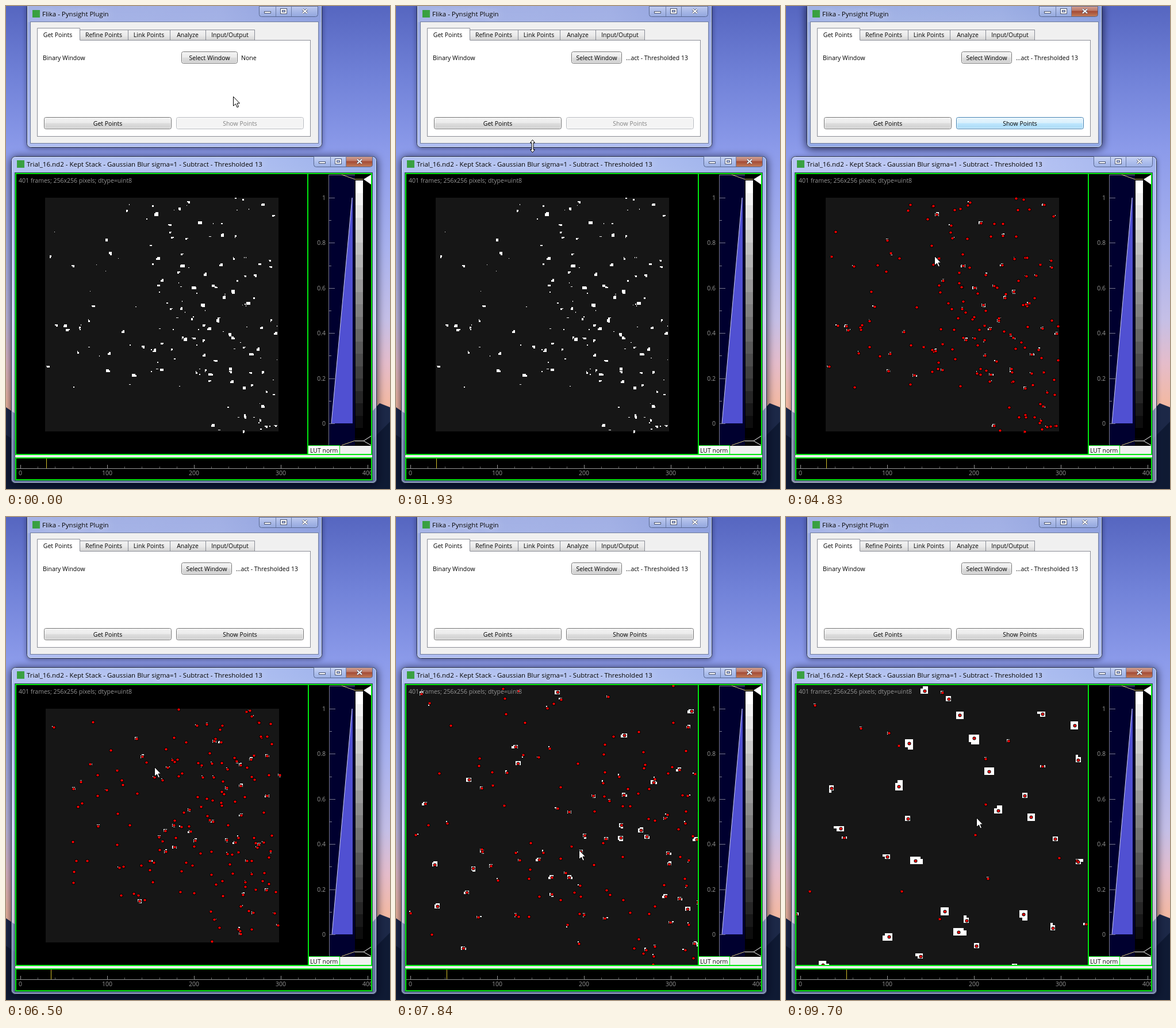
Animation, 668 px wide and 839 px high, one loop 9.73 s. Source, as an HTML page with a canvas:

```html
<!DOCTYPE html>
<html lang="en">
<head>
<meta charset="utf-8">
<title>Get Points</title>
<style>
html, body { margin: 0; width: 100%; height: 100%; overflow: hidden; background: #101830; }
canvas { display: block; }
</style>
</head>
<body>
<canvas id="stage" width="668" height="839"></canvas>
<script>
const ctx = document.getElementById('stage').getContext('2d');
const LOOP = 9730, W = 668, H = 839;
const SCALE = 406 / 256, LEFT = 69, TOP = 333, SIZE = 256;
const GREEN = '#00e810', GRAY = '#969696';
const UI = '10.5px "Open Sans", "Noto Sans", sans-serif';
const TITLE = '11.5px "Open Sans", "Noto Sans", sans-serif';

// What happens when, in ms
const PICK = 600, CHOSEN = 1360, GET = 2490, READY = 3060, SHOW = 4190, FOCUS = 5100;
const PLAY = 5800, ZOOM = 7840, RESUME = 8250;

// Pointer stops: time, x, y
const PATH = [
  [60, 395, 157], [420, 352, 92], [760, 352, 92], [1070, 359, 422], [1660, 359, 422],
  [1930, 237, 234], [2220, 215, 203], [3360, 215, 203], [3480, 322, 201], [3680, 372, 202],
  [4300, 372, 202], [4800, 258, 434], [7110, 258, 434], [7640, 318, 578], [RESUME, 318, 578],
  [8770, 331, 522]
];

const clamp = v => Math.max(0, Math.min(1, v));
const ramp = (t, a, b) => clamp((t - a) / (b - a));
const steps = (t, from, gap, max) => Math.max(0, Math.min(max, Math.floor((t - from) / gap + 1)));
const frameIndex = t => 30 + steps(t, PLAY, 167, 12) + steps(t, RESUME, 145, 11);

function random(seed) {
  let a = seed * 7919 + 17;
  return () => {
    a = (a + 0x6D2B79F5) | 0;
    let n = Math.imul(a ^ (a >>> 15), 1 | a);
    n = (n + Math.imul(n ^ (n >>> 7), 61 | n)) ^ n;
    return ((n ^ (n >>> 14)) >>> 0) / 4294967296;
  };
}

// Wheel zoom around one point of the picture
function view(t) {
  const step = steps(t, ZOOM, 52, 6);
  if (!step) return { s: SCALE, x: t < CHOSEN ? LEFT - 1 : LEFT, y: TOP };
  const s = 2.2 * 1.15 ** (step - 1);
  return { s, x: 318 - (318 - LEFT) / SCALE * s, y: 580 - (580 - TOP) / SCALE * s };
}

// Spots get denser to the right and thin out in the left corners
function makeSpots(index) {
  const rnd = random(index), list = [];
  while (list.length < 178) {
    const x = rnd(), y = rnd(), keep = rnd(), kind = rnd();
    const empty = x < 0.08 || (x < 0.35 && y < 0.17) || (x < 0.68 && y > 0.82);
    const density = empty ? 0.04 : 0.28 + 0.5 * x * x + 0.25 * x * y;
    if (keep > density) continue;
    const size = kind < 0.42 ? 1 : kind < 0.8 ? 2 : 3;
    list.push({
      x: Math.floor(x * SIZE), y: Math.floor(y * SIZE),
      w: size + (rnd() < 0.3 ? 1 : 0), h: size,
      bump: size > 1 ? Math.floor(rnd() * 5) : 4
    });
  }
  return list;
}
const cache = {};
const spotsAt = index => cache[index] || (cache[index] = makeSpots(index));

function rect(x, y, w, h, fill) {
  ctx.fillStyle = fill;
  ctx.fillRect(x, y, w, h);
}
function frame(x, y, w, h, color, width = 1) {
  ctx.strokeStyle = color;
  ctx.lineWidth = width;
  ctx.strokeRect(x + width / 2, y + width / 2, w - width, h - width);
}
function line(color, width, ...p) {
  ctx.strokeStyle = color;
  ctx.lineWidth = width;
  ctx.beginPath();
  for (let i = 0; i < p.length; i += 2) ctx.lineTo(p[i], p[i + 1]);
  ctx.stroke();
}
function poly(fill, ...p) {
  ctx.fillStyle = fill;
  ctx.beginPath();
  for (let i = 0; i < p.length; i += 2) ctx.lineTo(p[i], p[i + 1]);
  ctx.closePath();
  ctx.fill();
}
function disc(x, y, r, fill) {
  ctx.fillStyle = fill;
  ctx.beginPath();
  ctx.arc(x, y, r, 0, 7);
  ctx.fill();
}
function text(s, x, y, color = '#000', align = 'left', font = UI) {
  ctx.font = font;
  ctx.fillStyle = color;
  ctx.textAlign = align;
  ctx.fillText(s, x, y);
}
function blend(y0, y1, ...stops) {
  const g = ctx.createLinearGradient(0, y0, 0, y1);
  stops.forEach((c, i) => Array.isArray(c)
    ? g.addColorStop(c[0], c[1]) : g.addColorStop(i / (stops.length - 1), c));
  return g;
}
function rounded(x, y, w, h, r) {
  ctx.beginPath();
  ctx.roundRect(x, y, w, h, r);
}
function clipTo(x, y, w, h) {
  ctx.save();
  ctx.beginPath();
  ctx.rect(x, y, w, h);
  ctx.clip();
}

function drawDesktop() {
  rect(0, 0, W, H, blend(0, H, [0, '#5666c0'], [0.15, '#7182d8'], [0.3, '#8c9bea'],
    [0.5, '#a9b2ee'], [0.65, '#c5bfe6'], [0.74, '#e5bcca'], [0.82, '#f2b9a4'], [1, '#e6a080']));
  poly('#1c2847', 0, 697, 22, 712, 60, 740, 600, 745, 650, 690, W, 697, W, H, 0, H);
  poly('#0f1a33', 0, 745, 30, 765, 620, 770, W, 722, W, H, 0, H);
}

function drawWindow(x, y, w, h, titleY, title, active) {
  ctx.save();
  ctx.beginPath();
  ctx.rect(0, 0, W, H);
  ctx.roundRect(x, y, w, h, 7);
  ctx.clip('evenodd');
  ctx.shadowColor = active ? 'rgba(0,0,20,.8)' : 'rgba(0,0,20,.45)';
  ctx.shadowBlur = active ? 15 : 9;
  ctx.shadowOffsetY = 2;
  rounded(x, y, w, h, 7);
  ctx.fillStyle = '#000';
  ctx.fill();
  ctx.restore();

  rounded(x, y, w, h, 7);
  ctx.fillStyle = active
    ? blend(y, y + h, 'rgba(172,194,240,.65)', 'rgba(205,220,245,.65)', 'rgba(150,178,228,.6)')
    : blend(y, y + h, 'rgba(190,206,246,.6)', 'rgba(205,218,248,.55)');
  ctx.fill();
  ctx.save();
  ctx.clip();
  const shine = ctx.createLinearGradient(x, 0, x + w, 0);
  shine.addColorStop(0, 'rgba(255,255,255,.15)');
  shine.addColorStop(0.65, 'rgba(255,255,255,.12)');
  shine.addColorStop(1, 'rgba(90,120,200,.12)');
  rect(x, y, w, titleY - y + 15, shine);
  ctx.restore();
  rounded(x + 0.5, y + 0.5, w - 1, h - 1, 7);
  ctx.strokeStyle = '#28304c';
  ctx.lineWidth = 1;
  ctx.stroke();
  rounded(x + 1.5, y + 1.5, w - 3, h - 3, 6);
  ctx.strokeStyle = 'rgba(235,245,255,.65)';
  ctx.stroke();

  rect(x + 10, titleY - 6, 13, 13, '#38a040');
  ctx.save();
  ctx.shadowColor = 'rgba(255,255,255,.95)';
  ctx.shadowBlur = 11;
  text(title, x + 27, titleY + 4.5, '#000', 'left', TITLE);
  ctx.restore();
  drawControls(x + w - 110, titleY - 13, active);
}

function drawControls(x, y, active) {
  rounded(x + 0.5, y + 0.5, 102, 18, [0, 0, 4, 4]);
  ctx.fillStyle = blend(y, y + 18, 'rgba(225,233,252,.6)', 'rgba(150,172,222,.5)');
  ctx.fill();
  if (active) {
    rounded(x + 57, y, 46, 18, [0, 0, 4, 0]);
    ctx.fillStyle = blend(y, y + 18, [0, '#d0a398'], [0.45, '#bd7866'], [0.5, '#a34a35'], [1, '#c07a58']);
    ctx.fill();
  }
  rounded(x + 0.5, y + 0.5, 102, 18, [0, 0, 4, 4]);
  ctx.strokeStyle = '#56658f';
  ctx.lineWidth = 1;
  ctx.stroke();
  line('#6b7ba6', 1, x + 29.5, y, x + 29.5, y + 18);
  line('#6b7ba6', 1, x + 56.5, y, x + 56.5, y + 18);
  rect(x + 9, y + 9, 12, 4, '#4a5470');
  rect(x + 10, y + 10, 10, 2, '#fff');
  frame(x + 37, y + 4, 12, 10, '#4a5470');
  frame(x + 38, y + 5, 10, 8, '#fff', 2);
  frame(x + 40, y + 7, 6, 4, '#4a5470');
  for (const [color, width] of [['#4a4f66', 3.6], ['#fff', 1.9]]) {
    line(color, width, x + 76, y + 5.5, x + 84, y + 12.5);
    line(color, width, x + 84, y + 5.5, x + 76, y + 12.5);
  }
}

function drawButton(label, x, y, w, hover = 0, enabled = true) {
  const h = 21;
  rounded(x + 0.5, y + 0.5, w - 1, h - 1, 3);
  ctx.fillStyle = enabled
    ? blend(y, y + h, [0, '#f3f3f3'], [0.48, '#ebebeb'], [0.52, '#dddddd'], [1, '#cfcfcf']) : '#f4f4f4';
  ctx.fill();
  if (hover > 0) {
    ctx.globalAlpha = hover;
    ctx.fillStyle = blend(y, y + h, [0, '#eaf6fd'], [0.48, '#d9f0fc'], [0.52, '#bee6fd'], [1, '#a7d9f5']);
    ctx.fill();
    ctx.globalAlpha = 1;
  }
  ctx.strokeStyle = !enabled ? '#b5b8bd' : hover > 0.5 ? '#3c7fb1' : '#707070';
  ctx.lineWidth = 1;
  ctx.stroke();
  rounded(x + 1.5, y + 1.5, w - 3, h - 3, 2);
  ctx.strokeStyle = 'rgba(255,255,255,.75)';
  ctx.stroke();
  text(label, x + w / 2, y + 14.5, enabled ? '#000' : '#838383', 'center');
}

function drawPlugin(t, active) {
  drawWindow(36, -6, 514, 252, 13, 'Flika - Pynsight Plugin', active);
  rect(42, 27, 502, 212, '#6f7c9c');
  rect(43, 28, 500, 210, '#f0f0f0');
  rect(54, 59, 476, 168, '#fff');
  frame(54, 59, 476, 168, '#898c95');
  let tabX = 128;
  for (const [label, w] of [['Refine Points', 84], ['Link Points', 73], ['Analyze', 62], ['Input/Output', 85]]) {
    rect(tabX, 41, w + 1, 19, blend(41, 60, '#f2f2f2', '#ebebeb', '#d2d2d2'));
    frame(tabX, 41, w + 1, 19, '#898c95');
    text(label, tabX + w / 2, 54, '#000', 'center');
    tabX += w;
  }
  rect(54, 38, 75, 22, '#fff');
  line('#898c95', 1, 54.5, 60, 54.5, 38.5, 128.5, 38.5, 128.5, 59.5);
  text('Get Points', 90, 53.5, '#000', 'center');

  const chosen = t >= CHOSEN;
  text('Binary Window', 64, 94);
  const selectHover = ramp(t, 330, 480) * (1 - ramp(t, 780, 960));
  drawButton('Select Window', 305, 79, chosen ? 88 : 98, selectHover);
  text(chosen ? '...act - Thresholded 13' : 'None', chosen ? 400 : 409, 94);
  const getHover = ramp(t, 2060, 2220) * (1 - ramp(t, 3480, 3680));
  const showHover = ramp(t, 3500, 3680) * (1 - ramp(t, FOCUS, FOCUS + 300));
  drawButton('Get Points', 66, 193, 222, getHover);
  drawButton('Show Points', 296, 193, 222, showHover, t >= READY);
}

function drawSpots(t, index, width) {
  const v = view(t), spots = spotsAt(index);
  const sx = x => Math.round(v.x + x * v.s), sy = y => Math.round(v.y + y * v.s);
  const cells = (x, y, w, h, fill) => rect(sx(x), sy(y), sx(x + w) - sx(x), sy(y + h) - sy(y), fill);
  clipTo(18, 292, width, 486);
  cells(0, 0, SIZE, SIZE, '#161616');
  for (const { x, y, w, h, bump } of spots) {
    cells(x, y, w, h, '#fff');
    if (bump < 2) cells(bump ? x + w : x - 1, y + (h > 2 ? 1 : 0), 1, h - 1, '#fff');
    else if (bump < 4) cells(x + (w > 2 ? 1 : 0), bump === 2 ? y - 1 : y + h, w - 1, 1, '#fff');
  }
  if (t >= SHOW) {
    for (const { x, y, w, h } of spots) {
      const cx = sx(x + w / 2) + 0.5, cy = sy(y + h / 2) + 0.5;
      disc(cx, cy, 3, '#000');
      disc(cx, cy, 2.1, '#f00');
    }
  }
  ctx.restore();
}

function drawLevels(dx) {
  const x = 561 + dx, y = v => 725 - v * 392;
  rect(x, 293, 607 - x, 470, '#00002f');
  poly('#5050d2', x + 5, 725, 602, 333, 603, 333, 603, 725);
  line('#c8c8e8', 1, x + 5, 725, 602, 333);
  line('#78788c', 1, x + 0.5, 293, x + 0.5, 763);
  line('#78788c', 1, x, 293.5, 607, 293.5);
  for (let i = 0; i <= 10; i++) {
    const ty = Math.round(y(i / 10)) + 0.5;
    line('#78788c', 1, x, ty, x + (i % 2 ? 5 : 11), ty);
    if (i % 2 === 0) text(String(i / 10), 556, ty + 3.5, GRAY, 'right');
  }
  const bands = 21, step = 452 / bands;
  for (let i = 0; i < bands; i++) {
    const c = Math.round(255 * (1 - i / (bands - 1)));
    rect(608, Math.round(303 + i * step), 13, Math.ceil(step), `rgb(${c},${c},${c})`);
  }
  line('#d8c878', 1, 584, 293, 607, 301, 621, 301);
  line('#d8c878', 1, 584, 763, 607, 755);
  poly('#fff', 622, 301, 635, 293, 635, 310);
  line('#fff', 1, 607, 755.5, 622, 755.5, 635, 747);
  line('#fff', 1, 622, 755.5, 635, 763);
}

function drawTimeline(index) {
  const tick = i => Math.round(25 + i * 1.51) + 0.5;
  rect(16, 780, 621, 4, '#f0f0f0');
  rect(16, 784, 621, 40, '#000');
  clipTo(18, 786, 617, 36);
  line(GRAY, 1, 18, 803.5, 635, 803.5);
  for (let i = 0; i <= 400; i += 20) {
    const x = tick(i), major = i % 100 === 0;
    line(major ? GRAY : '#606060', 1, x, major ? 797 : 800, x, 803);
    if (major) text(String(i), x - 0.5, 815, GRAY, 'center');
  }
  line('#d2c028', 1, tick(index), 786, tick(index), 803);
  ctx.restore();
  frame(16, 784, 621, 40, GREEN, 2);
}

function drawImageWindow(t, active) {
  const index = frameIndex(t), dx = t < CHOSEN ? 0 : 1;
  drawWindow(9, 261, 636, 568, 274,
    'Trial_16.nd2 - Kept Stack - Gaussian Blur sigma=1 - Subtract - Thresholded 13', active);
  rect(15, 289, 623, 536, '#36415e');
  rect(16, 290, 621, 490, '#000');
  drawSpots(t, index, 506 + dx);
  text('401 frames; 256x256 pixels; dtype=uint8', 22, 307, GRAY);
  drawLevels(dx);
  rect(525, 764, 111, 15, '#f0f0f0');
  rect(526, 764, 54, 14, '#fff');
  text('LUT norm', 529, 775.5);
  frame(525, 763, 56, 16, GREEN);
  frame(16, 290, 621, 490, GREEN, 2);
  rect(524 + dx, 290, 2, 490, GREEN);
  drawTimeline(index);
}

function pointer(t) {
  const next = PATH.findIndex(p => p[0] >= t);
  if (next < 1) return PATH[next ? PATH.length - 1 : 0].slice(1);
  const [t0, x0, y0] = PATH[next - 1], [t1, x1, y1] = PATH[next], k = ramp(t, t0, t1);
  return [Math.round(x0 + (x1 - x0) * k), Math.round(y0 + (y1 - y0) * k)];
}

function drawPointer(t) {
  const [x, y] = pointer(t);
  const resizing = t > 1660 && t < 2060 && y >= 228 && y < 246;
  const shape = resizing
    ? [0, -2, 4, 3, 1.5, 3, 1.5, 15, 4, 15, 0, 20, -4, 15, -1.5, 15, -1.5, 3, -4, 3]
    : [0, 0, 0, 16, 4, 12.5, 6.5, 18.5, 9, 17.5, 6.5, 11.5, 11, 11.5];
  ctx.save();
  ctx.translate(x + 0.5, y + 0.5);
  poly('#fff', ...shape);
  ctx.strokeStyle = '#000';
  ctx.lineWidth = 1;
  ctx.stroke();
  ctx.restore();
}

function draw(now) {
  const t = now % LOOP;
  const pluginActive = (t >= PICK && t < CHOSEN) || (t >= GET && t < FOCUS);
  drawDesktop();
  if (pluginActive) {
    drawImageWindow(t, false);
    drawPlugin(t, true);
  } else {
    drawPlugin(t, false);
    drawImageWindow(t, true);
  }
  drawPointer(t);
}

let start;
function tick(now) {
  if (start === undefined) start = now;
  draw(Math.max(0, now - start));
  requestAnimationFrame(tick);
}
requestAnimationFrame(tick);
</script>
</body>
</html>
```
